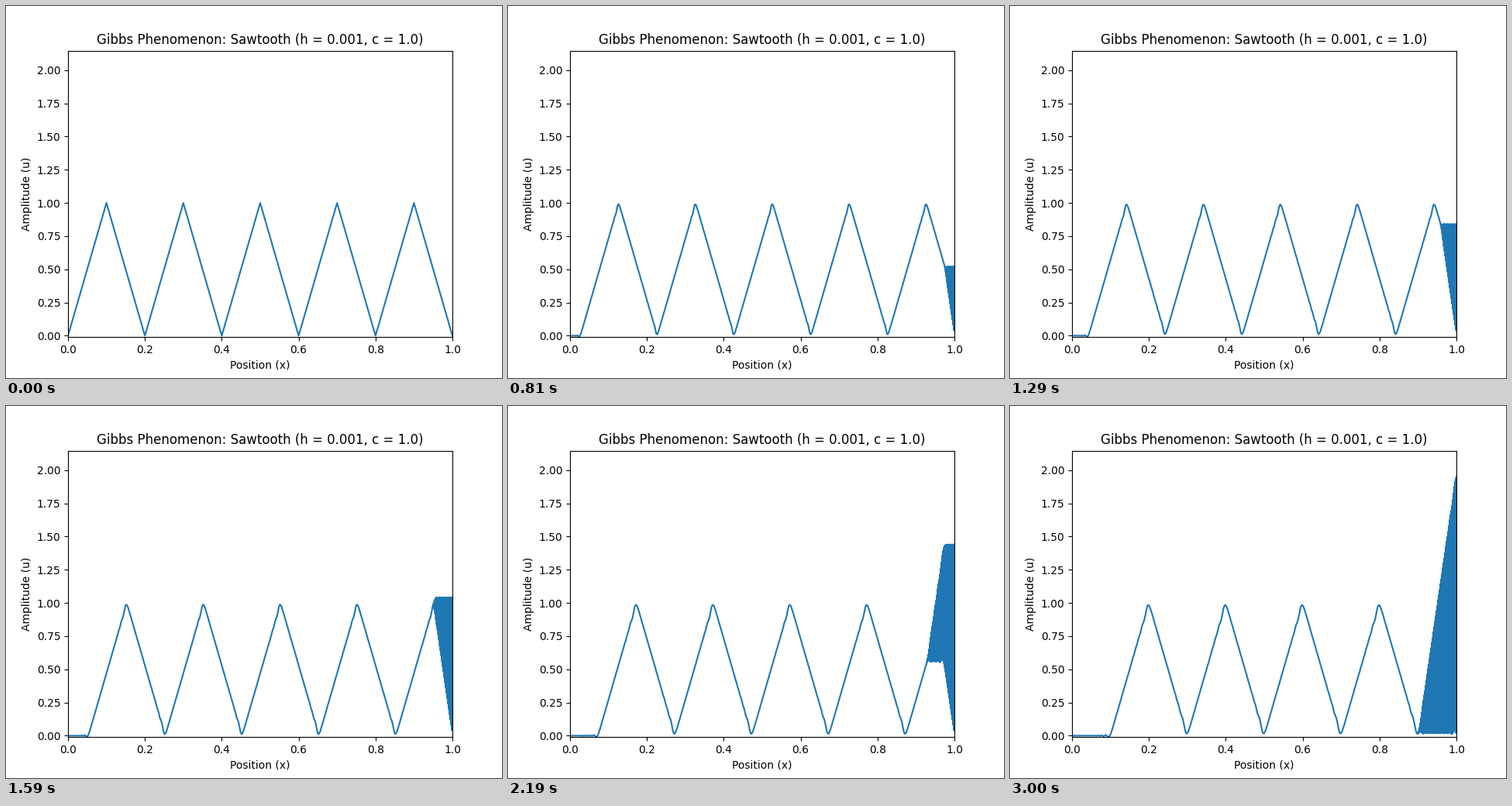
Write a matplotlib script that moves like this. It is 640 by 480 pixels and loops after 3030 ms.

```python
import numpy as np
import matplotlib.pyplot as plt
from matplotlib.animation import FuncAnimation

H = 0.001        # grid spacing and time per frame
C = 1.0          # wave speed
FRAMES = 101
SUBSTEPS = 4


def triangle(x, period=0.2):
    phase = (x / period) % 1.0
    return 1 - np.abs(2 * phase - 1)


def rate(u):
    """Central-difference advection with zero values beyond both ends."""
    padded = np.pad(u, 1)
    return -C * (padded[2:] - padded[:-2]) / (2 * H)


def rk4(u, dt):
    k1 = rate(u)
    k2 = rate(u + dt / 2 * k1)
    k3 = rate(u + dt / 2 * k2)
    k4 = rate(u + dt * k3)
    return u + dt / 6 * (k1 + 2 * k2 + 2 * k3 + k4)


def solve(u):
    states = [u]
    for _ in range(FRAMES - 1):
        for _ in range(SUBSTEPS):
            u = rk4(u, H / SUBSTEPS)
        states.append(u)
    return np.array(states)


x = np.arange(1001) / 1000
start = triangle(x)
start[np.abs(start) < 1e-9] = 0
waves = solve(start)

fig, ax = plt.subplots(figsize=(6.4, 4.8), dpi=100)
line, = ax.plot(x, waves[0])
ax.set_xlim(0, 1)
ax.set_ylim(1.1 * waves.min(), 1.1 * waves.max())
ax.set_xlabel("Position (x)")
ax.set_ylabel("Amplitude (u)")
ax.set_title(f"Gibbs Phenomenon: Sawtooth (h = {H}, c = {C})")


def update(i):
    line.set_ydata(waves[i])
    return line,


anim = FuncAnimation(fig, update, frames=FRAMES, interval=30, repeat=True)
plt.show()
```
